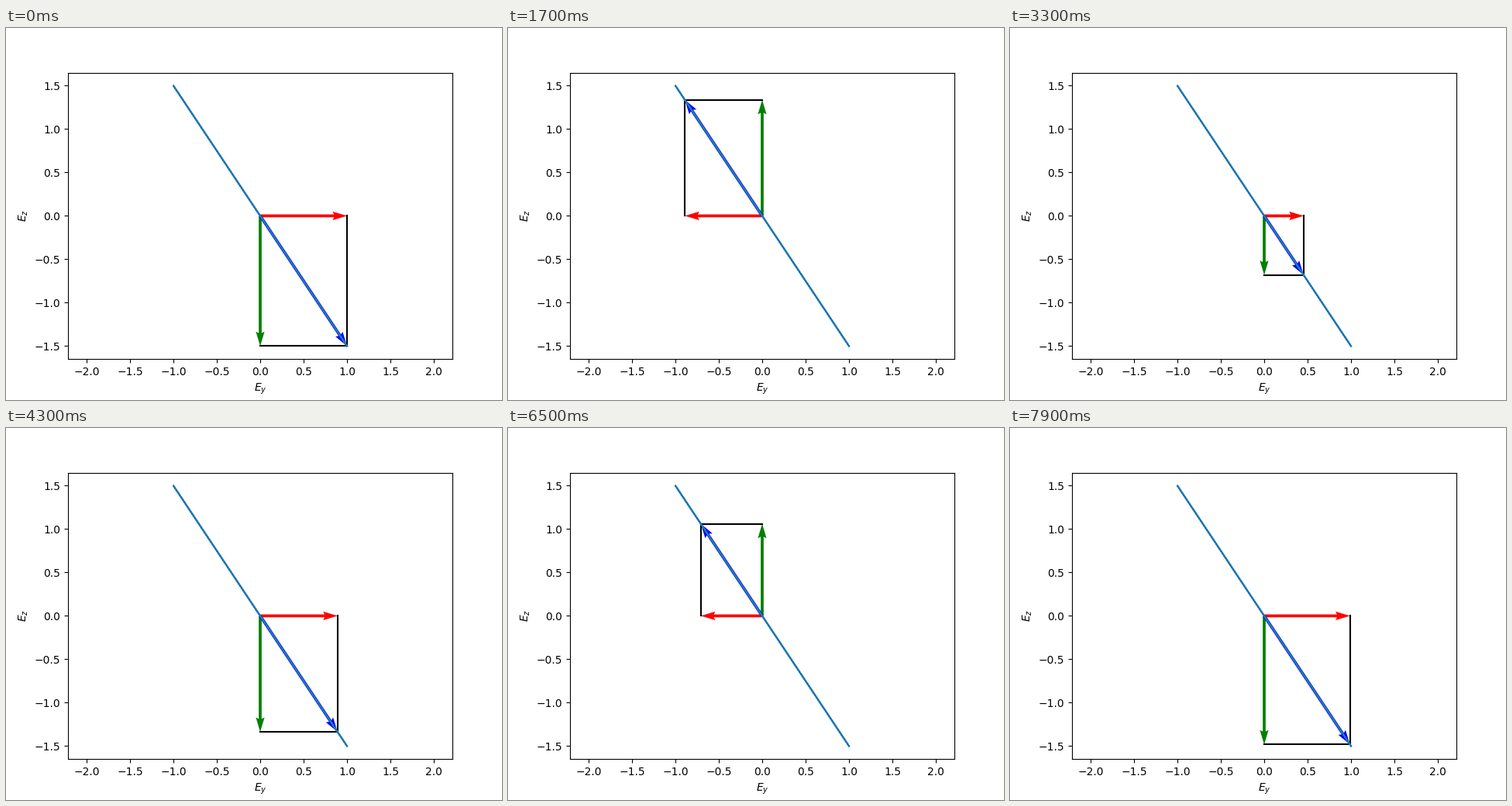
A matplotlib script that plays this animation: 640x480 px, repeating every 8000 ms.

```python
import numpy as np
import matplotlib.pyplot as plt
from matplotlib.animation import FuncAnimation

FRAMES = 80
PERIOD = 40          # frames per oscillation
AMP_Y, AMP_Z = 1.0, -1.5


def field(phase):
    """Both field components oscillate in phase: linear polarisation."""
    return AMP_Y * np.cos(phase), AMP_Z * np.cos(phase)


fig, ax = plt.subplots(figsize=(6.4, 4.8), dpi=100)
ax.set_xlabel("$E_y$")
ax.set_ylabel("$E_z$")
half_height = 1.65
half_width = half_height * (0.775 * 6.4) / (0.77 * 4.8)
ax.set_xlim(-half_width, half_width)
ax.set_ylim(-half_height, half_height)


def arrow(color):
    return ax.quiver([0], [0], [1], [0], color=color,
                     angles="xy", scale_units="xy", scale=1)


arrow_y, arrow_z, arrow_sum = arrow("red"), arrow("green"), arrow("blue")
side_v, = ax.plot([], [], "k")
side_h, = ax.plot([], [], "k")
ax.plot(*field(np.linspace(0, 2 * np.pi, 100)), color="C0")


def update(i):
    y, z = field(2 * np.pi * i / PERIOD)
    arrow_y.set_UVC([y], [0])
    arrow_z.set_UVC([0], [z])
    arrow_sum.set_UVC([y], [z])
    side_v.set_data([y, y], [0, z])
    side_h.set_data([0, y], [z, z])
    return arrow_y, arrow_z, arrow_sum, side_v, side_h


anim = FuncAnimation(fig, update, frames=FRAMES, interval=100,
                     repeat=True, repeat_delay=0)
plt.show()
```
